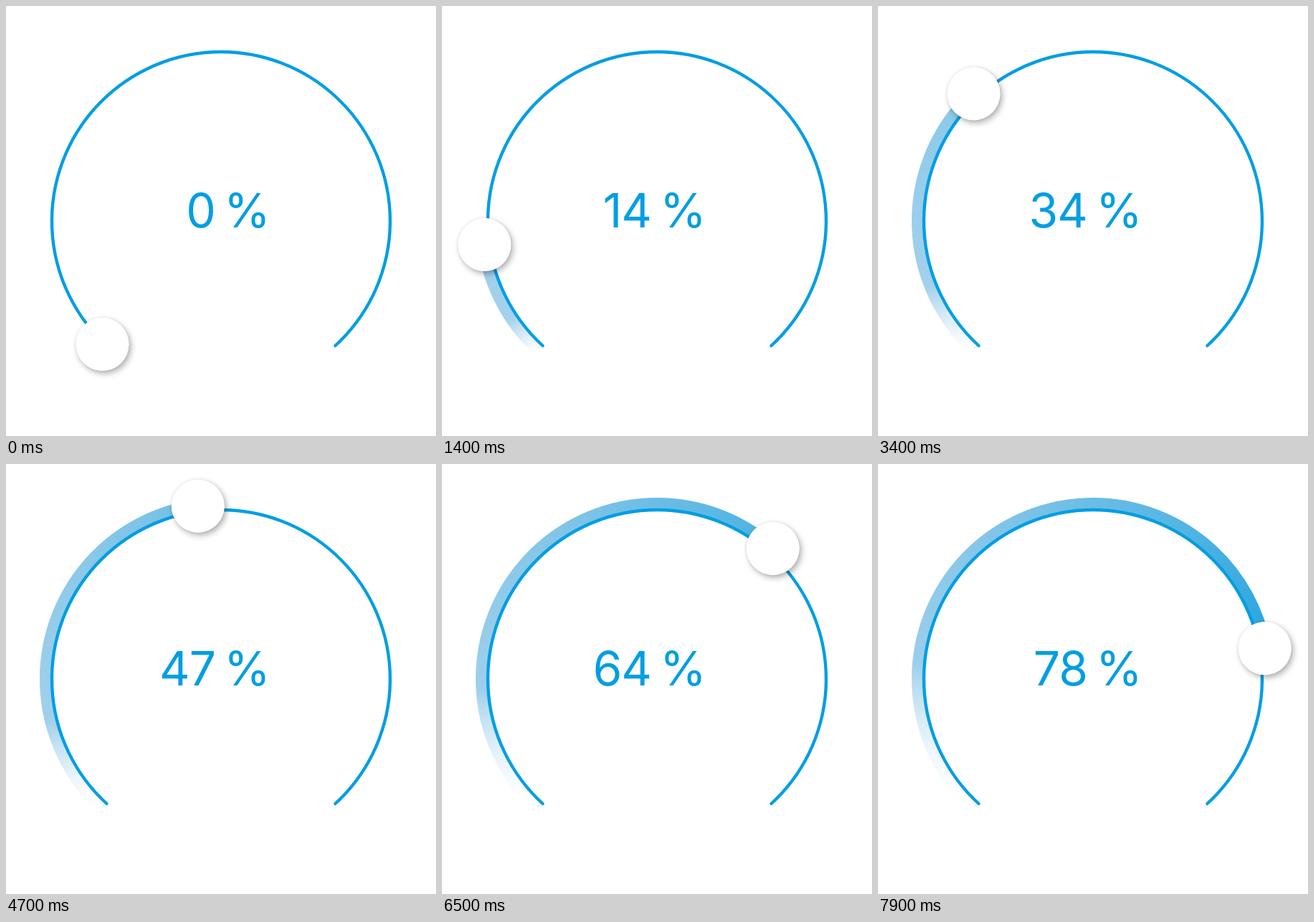
These frames come from a looping animation (600 px wide and 600 px high, 8000 ms). An HTML page with a canvas:

```html
<!DOCTYPE html>
<html lang="en">
<head>
<meta charset="utf-8">
<title>Circular slider</title>
<style>
  html, body { margin: 0; height: 100%; overflow: hidden; background: #fff; }
  canvas { display: block; }
</style>
</head>
<body>
<canvas id="stage" width="600" height="600"></canvas>
<script>
const ctx = document.getElementById('stage').getContext('2d');
const CENTER = 300, START = 133, SWEEP = 217;
const BLUE = '#009ee3', WHITE = [255, 255, 255], PALE = [165, 210, 236], DEEP = [38, 164, 222];

const rad = deg => deg * Math.PI / 180;
const mix = (a, b, f) => a.map((v, n) => v + (b[n] - v) * f);

function arc(radius, from, to, width, style, cap) {
  ctx.beginPath();
  ctx.arc(CENTER, CENTER, radius, rad(from), rad(to));
  ctx.lineWidth = width;
  ctx.lineCap = cap;
  ctx.strokeStyle = style;
  ctx.stroke();
}

// The bar deepens along its sweep; its faded tail grows longer and softer as it fills
function barGradient(step) {
  const gradient = ctx.createConicGradient(rad(START), CENTER, CENTER);
  const tail = 5 + step * 0.6, softness = 1 + step / 79;
  for (let d = 0; d <= SWEEP; d++) {
    const color = mix(PALE, DEEP, (d / SWEEP) ** 1.7);
    const fade = Math.min(1, d / tail) ** softness;
    gradient.addColorStop(d / 360, `rgb(${mix(WHITE, color, fade).map(Math.round)})`);
  }
  return gradient;
}

function disc(x, y, shadow, blur, dx, dy) {
  ctx.save();
  ctx.shadowColor = shadow;
  ctx.shadowBlur = blur;
  ctx.shadowOffsetX = dx;
  ctx.shadowOffsetY = dy;
  ctx.fillStyle = '#fff';
  ctx.beginPath();
  ctx.arc(x, y, 37, 0, 2 * Math.PI);
  ctx.fill();
  ctx.restore();
}

function draw(step) {
  ctx.fillStyle = '#fff';
  ctx.fillRect(0, 0, 600, 600);

  const angle = 133.9 + 2.734 * step;
  if (step) arc(244.5, START, angle, 17, barGradient(step), 'butt');
  arc(236, 132.5, 407.5, 4.4, BLUE, 'round');

  // The knob starts near the line and drifts slightly outwards
  const radius = 243.5 - 4.8 * 0.85 ** step;
  const x = CENTER + radius * Math.cos(rad(angle));
  const y = CENTER + radius * Math.sin(rad(angle));
  disc(x, y, 'rgba(0,0,0,.3)', 8, 3, 4);
  disc(x, y, 'rgba(0,70,80,.11)', 4, 0, 0);

  ctx.fillStyle = BLUE;
  ctx.font = '400 66px Inter, sans-serif';
  ctx.letterSpacing = '-1px';
  ctx.textAlign = 'right';
  ctx.fillText(Math.round(step * 0.99), 292, 309);
  ctx.textAlign = 'center';
  ctx.fillText('%', 336, 309);
}

function tick() {
  draw(Math.floor(performance.now() % 8000 / 100));
  requestAnimationFrame(tick);
}
tick();
</script>
</body>
</html>
```
